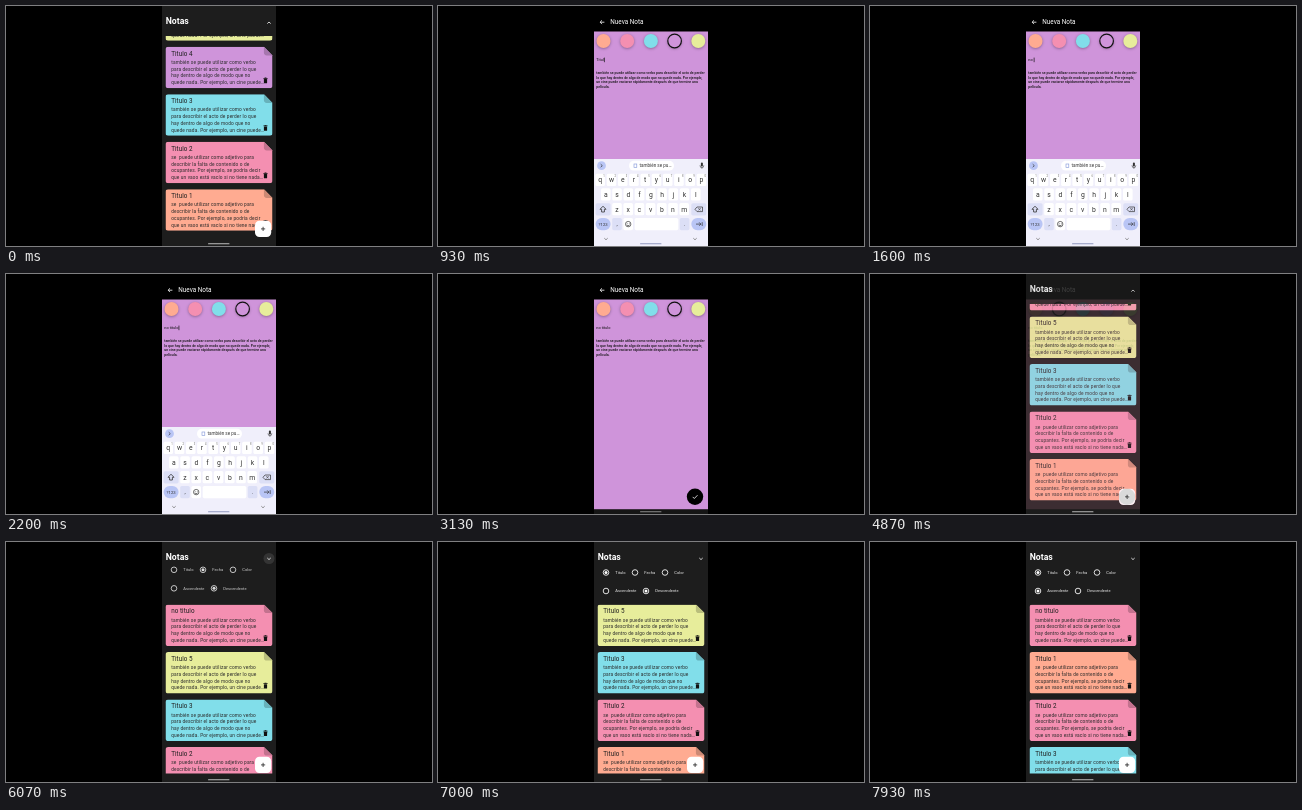
Animation of 426x240 px, one loop 8 s. Source, as an HTML page with a canvas:

```html
<!DOCTYPE html>
<html lang="es">
<head>
<meta charset="utf-8">
<title>Notas</title>
<style>
  html, body { margin: 0; width: 100%; height: 100%; overflow: hidden; background: #000; }
  canvas { position: absolute; left: 0; top: 0; width: 426px; height: 240px; }
</style>
</head>
<body>
<canvas id="editor"></canvas>
<canvas id="list"></canvas>
<script>
const LOOP = 8000, W = 426, H = 240;
const LEFT = 156, WIDTH = 114;
const SANS = 'Roboto, sans-serif';
const ORANGE = [255, 171, 145], PINK = [244, 143, 177], BLUE = [129, 222, 234],
      VIOLET = [207, 148, 218], YELLOW = [231, 237, 155];
const SWATCHES = [ORANGE, PINK, BLUE, VIOLET, YELLOW];

const VERB = ['también se puede utilizar como verbo', 'para describir el acto de perder lo que',
  'hay dentro de algo de modo que no', 'quede nada. Por ejemplo, un cine puede…'];
const ADJECTIVE = ['se  puede utilizar como adjetivo para', 'describir la falta de contenido o de',
  'ocupantes. Por ejemplo, se podría decir', 'que un vaso está vacío si no tiene nada…'];
const FULL = ['también se puede utilizar como verbo para describir el acto de perder',
  'lo que hay dentro de algo de modo que no quede nada. Por ejemplo,',
  'un cine puede vaciarse rápidamente después de que termine una', 'película.'];

const note = (title, color, lines) => ({ title, color, lines });
const n1 = note('Titulo 1', ORANGE, ADJECTIVE), n2 = note('Titulo 2', PINK, ADJECTIVE),
      n3 = note('Titulo 3', BLUE, VERB), n4 = note('Titulo 4', VIOLET, VERB),
      n5 = note('Titulo 5', YELLOW, VERB), renamed = note('no titulo', PINK, VERB);

// Key moments in ms
const OPEN_NOTE = 270, KEYS_UP = 500, KEYS_DOWN = 2800, TAP_PINK = 4130, SAVE = 4590,
      SCROLL = 5070, FILTER = 5930, BY_TITLE = 6530, ASCENDING = 7330;

const setup = id => {
  const canvas = document.getElementById(id), dpr = window.devicePixelRatio || 1;
  canvas.width = W * dpr;
  canvas.height = H * dpr;
  const ctx = canvas.getContext('2d');
  ctx.scale(dpr, dpr);
  return ctx;
};
const editor = setup('editor'), list = setup('list');
let g = editor;

const clamp = v => Math.max(0, Math.min(1, v));
const ramp = (t, start, length) => clamp((t - start) / length);
const easeOut = p => 1 - (1 - p) ** 3;
const smooth = p => p * p * (3 - 2 * p);
const mix = (a, b, p) => a.map((v, i) => v + (b[i] - v) * p);
const rgb = c => `rgb(${c.map(Math.round).join(',')})`;

function text(str, x, y, size, color, { weight = 400, align = 'left', spacing = 0 } = {}) {
  g.font = `${weight} ${size}px ${SANS}`;
  g.letterSpacing = spacing + 'px';
  g.textAlign = align;
  g.fillStyle = color;
  g.fillText(str, x, y);
}
function rect(x, y, w, h, color, r = 0) {
  g.fillStyle = color;
  g.beginPath();
  g.roundRect(x, y, w, h, r);
  g.fill();
}
function circle(x, y, r, fill, stroke, width = 1) {
  g.beginPath();
  g.arc(x, y, r, 0, Math.PI * 2);
  if (fill) { g.fillStyle = fill; g.fill(); }
  if (stroke) { g.strokeStyle = stroke; g.lineWidth = width; g.stroke(); }
}
function line(points, color, width = 0.8) {
  g.strokeStyle = color;
  g.lineWidth = width;
  g.beginPath();
  points.forEach(([x, y]) => g.lineTo(x, y));
  g.stroke();
}
const chevron = (x, y, dy, color, w = 1.7) => line([[x - w, y - dy], [x, y + dy], [x + w, y - dy]], color);

// ----- Note list -----
function trash(x, y) {
  rect(x - 1.6, y - 1.5, 3.2, 4.2, '#111', 0.5);
  rect(x - 2.1, y - 2.6, 4.2, 0.8, '#111');
  rect(x - 0.9, y - 3, 1.8, 0.6, '#111');
}
function card({ title, color, lines }, y) {
  const x = 159.5, w = 107, h = 41.5, cut = 8.6, r = 2.8;
  g.save();
  g.beginPath();
  g.moveTo(x, y);
  for (const [px, py] of [[x + w - cut, y], [x + w, y + cut], [x + w, y + h], [x, y + h]]) g.lineTo(px, py);
  g.clip();
  rect(x, y, w, h, rgb(color), r);
  rect(x + w - cut, y - 20, cut + 20, cut + 20, rgb(mix(color, [0, 0, 0], 0.2)), r);
  g.restore();
  text(title, x + 5.7, y + 8.8, 6.3, '#202020', { spacing: 0.05 });
  lines.forEach((s, i) => text(s, x + 5.7, y + 17.1 + i * 6.7, 4.8, '#2a2a2a', { spacing: 0.13 }));
  trash(259.5, y + 33.8);
}
function radio(x, y, label, on) {
  circle(x, y, 2.8, null, '#fff', 0.85);
  if (on) circle(x, y, 1.5, '#fff');
  text(label, x + 9.3, y + 1.3, 4, '#f2f2f2');
}
function notesAt(t) {
  if (t < SAVE) return [n5, n4, n3, n2, n1];
  if (t < BY_TITLE) return [renamed, n5, n3, n2, n1];
  if (t < ASCENDING) return [n5, n3, n2, n1, renamed];
  return [renamed, n1, n2, n3, n5];
}
function filters(t) {
  const p = easeOut(ramp(t, FILTER, 300)), dy = -18 * (1 - p);
  const byTitle = t >= BY_TITLE, asc = t >= ASCENDING;
  g.save();
  g.globalAlpha = p;
  radio(168, 30.5 + dy, 'Titulo', byTitle);
  radio(197, 30.5 + dy, 'Fecha', !byTitle);
  radio(227, 30.5 + dy, 'Color', false);
  radio(168, 49 + dy, 'Ascendente', asc);
  radio(208, 49 + dy, 'Descendente', !asc);
  g.restore();
}
function drawList(t) {
  g = list;
  const open = t >= FILTER, top = open ? 62.5 : 30;
  const scroll = t < SAVE ? 36.7 : 35 * (1 - smooth(ramp(t, SCROLL, 420)));
  rect(LEFT, 0, WIDTH, H, '#1d1d1d');

  g.save();
  g.beginPath();
  g.rect(LEFT, top, WIDTH, 231.5 - top);
  g.clip();
  notesAt(t).forEach((n, i) => card(n, top - scroll + i * 47.5));
  g.restore();

  if (open) filters(t);
  const ripple = t >= FILTER - 60 ? 1 - ramp(t, FILTER + 120, 200) : 0;
  if (ripple) circle(263, 16.5, 5.5, `rgba(255,255,255,${0.12 * ripple})`);
  text('Notas', 159.7, 18.3, 8.7, '#fff', { weight: 700 });
  chevron(263, 16.8, open ? 0.8 : -0.8, '#fff');

  rect(249, 214.8, 16.2, 16.2, '#fff', 4.5);
  line([[255, 222.9], [259.2, 222.9]], '#222', 0.8);
  line([[257.1, 220.8], [257.1, 225]], '#222', 0.8);
  rect(202, 237.2, 21.5, 1.1, '#bdbdbd', 0.5);
}

// ----- Editor -----
function titleAt(t) {
  const before = 'Titulo 4', after = 'no titulo';
  if (t < 1270) return before.slice(0, before.length - Math.floor(clamp((t - 670) / 560) * before.length));
  return after.slice(0, Math.floor(ramp(t, 1270, 800) * after.length));
}
function letters(row, x, y, pitch) {
  [...row].forEach((ch, i) => {
    const cx = x + i * pitch;
    rect(cx - 4.8, y - 6.2, 9.6, 12.2, '#fff', 1.6);
    text(ch, cx, y + 2.2, 6.8, '#333', { align: 'center' });
  });
}
function keyboard(dy) {
  const ink = '#333', special = '#dcdff6', accent = '#b9c5f5';
  g.save();
  g.beginPath();
  g.rect(LEFT, 0, WIDTH, H);
  g.clip();
  g.translate(0, dy);
  rect(LEFT, 153, WIDTH, 87, '#f0effb');

  circle(163.5, 159.7, 4.4, accent);
  line([[162.7, 158.2], [164.3, 159.7], [162.7, 161.2]], ink, 0.7);
  rect(191, 154.8, 45, 9.8, '#fff', 4.9);
  g.strokeStyle = '#7f93d8';
  g.lineWidth = 0.6;
  g.strokeRect(196, 158, 2.8, 3.6);
  text('también se pu…', 201.5, 161.4, 4.6, ink);
  rect(262.9, 156.6, 2, 3.8, ink, 1);
  line([[262, 159.3], [262.6, 161.3], [265.2, 161.3], [265.8, 159.3]], ink, 0.6);
  line([[263.9, 161.3], [263.9, 162.8]], ink, 0.6);

  letters('qwertyuiop', 162.2, 174, 11.25);
  [...'1234567890'].forEach((d, i) => text(d, 166 + i * 11.25, 171, 2.6, '#666', { align: 'center' }));
  letters('asdfghjkl', 167.8, 188.5, 11.25);
  letters('zxcvbnm', 179, 203.3, 11.2);

  rect(157.6, 197.2, 15, 12.2, special, 1.6);
  g.strokeStyle = ink;
  g.lineWidth = 0.8;
  g.beginPath();
  for (const [x, y] of [[165, 200.2], [168, 203.3], [166.4, 203.3], [166.4, 206], [163.6, 206], [163.6, 203.3], [162, 203.3]]) g.lineTo(x, y);
  g.closePath();
  g.stroke();

  rect(253.3, 197.2, 15, 12.2, special, 1.6);
  line([[257, 203.3], [259, 201], [264.5, 201], [264.5, 205.6], [259, 205.6], [257, 203.3]], ink, 0.7);
  line([[260.3, 202.1], [262.7, 204.5]], ink, 0.6);
  line([[262.7, 202.1], [260.3, 204.5]], ink, 0.6);

  rect(157.6, 212, 15, 12.2, accent, 6.1);
  text('?123', 165.1, 219.6, 4.2, ink, { align: 'center' });
  rect(174.2, 212, 9.6, 12.2, special, 1.6);
  text(',', 179, 219.6, 6, ink, { align: 'center' });
  rect(185.4, 212, 9.6, 12.2, '#fff', 1.6);
  circle(190.2, 218.1, 2.7, null, ink, 0.7);
  circle(189.2, 217.4, 0.4, ink);
  circle(191.2, 217.4, 0.4, ink);
  g.beginPath();
  g.arc(190.2, 218.4, 1.3, 0.2, Math.PI - 0.2);
  g.stroke();
  rect(196.7, 212, 43.6, 12.2, '#fff', 1.6);
  rect(241.8, 212, 9.6, 12.2, special, 1.6);
  text('.', 246.6, 219.6, 6, ink, { align: 'center' });
  rect(253.3, 212, 15, 12.2, accent, 6.1);
  line([[258, 218.1], [262.8, 218.1]], ink, 0.7);
  line([[261.2, 216.4], [262.9, 218.1], [261.2, 219.8]], ink, 0.7);
  line([[264.2, 216.2], [264.2, 220]], ink, 0.7);

  chevron(168, 233, 0.8, '#777');
  chevron(257, 233, 0.8, '#777');
  g.restore();
}
function drawEditor(t) {
  g = editor;
  const picked = t < TAP_PINK ? 3 : 1;
  rect(0, 0, W, H, '#000');
  rect(LEFT, 25.5, WIDTH, 210, rgb(mix(VIOLET, PINK, ramp(t, TAP_PINK, 200))));
  rect(LEFT, 235.5, WIDTH, 4.5, '#151515');

  line([[166.4, 16.2], [162.2, 16.2]], '#fff', 0.8);
  line([[164, 14.3], [162.1, 16.2], [164, 18.1]], '#fff', 0.8);
  text('Nueva Nota', 172.2, 18.4, 6.4, '#fff');

  SWATCHES.forEach((c, i) => {
    g.save();
    g.shadowColor = 'rgba(0,0,0,0.35)';
    g.shadowBlur = 3;
    g.shadowOffsetY = 0.8;
    circle(165.5 + i * 23.7, 35, 7, rgb(c));
    g.restore();
    if (i === picked) circle(165.5 + i * 23.7, 35, 6.8, null, '#111', 1.2);
  });

  const title = titleAt(t);
  text(title, 158.3, 55.3, 3.9, '#111');
  const typing = t > KEYS_UP && t < KEYS_DOWN;
  if (typing) {
    const x = 158.3 + g.measureText(title).width + 0.5;
    line([[x, 51.6], [x, 56.2]], '#111', 0.7);
  }
  FULL.forEach((s, i) => text(s, 158.3, 67.9 + i * 4.65, 3.5, '#111', { weight: 500 }));

  circle(257, 222.7, 8.2, '#000');
  line([[254.7, 222.9], [256.3, 224.5], [259.5, 221.2]], '#fff', 0.8);

  const shown = easeOut(ramp(t, KEYS_UP, 200)) * (1 - smooth(ramp(t, KEYS_DOWN, 200)));
  if (shown > 0) keyboard(87 * (1 - shown));
  rect(202, 237.2, 21.5, 1.1, shown > 0.5 ? '#8f96bd' : '#8a8a8a', 0.5);
}

function frame() {
  const t = performance.now() % LOOP;
  const listAlpha = t < 2000 ? 1 - smooth(ramp(t, OPEN_NOTE, 230)) : smooth(ramp(t, SAVE, 370));
  list.canvas.style.opacity = listAlpha;
  if (listAlpha < 1) drawEditor(t);
  if (listAlpha > 0) drawList(t);
  requestAnimationFrame(frame);
}
requestAnimationFrame(frame);
</script>
</body>
</html>
```
